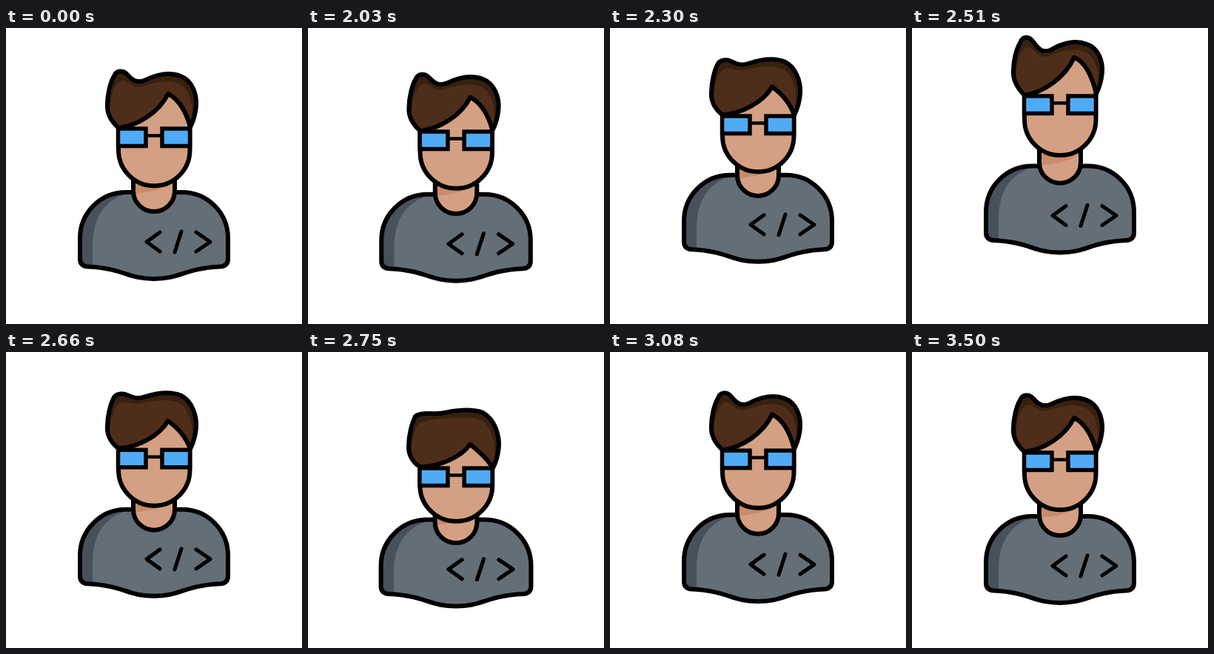
Animation, 400 px wide and 400 px high, one loop 3560 ms. Source, as an HTML page:

```html
<!DOCTYPE html>
<html lang="en">
<head>
<meta charset="utf-8">
<title>Jumping developer</title>
<style>
  html, body { margin: 0; width: 100%; height: 100%; overflow: hidden; background: #fff; }
  svg { display: block; width: 100vw; height: 100vh; }
  .line { fill: none; stroke: #000; stroke-width: 6; stroke-linejoin: round; stroke-linecap: round; }
</style>
</head>
<body>
<svg viewBox="0 0 400 400">
  <defs>
    <path id="torso" d="M100 284A62 62 0 0 1 162 222H238A62 62 0 0 1 300 284V312Q300 322 289 322.500C240 325 236 339 200 339S160 325 111 322.500Q100 322 100 312Z"/>
  </defs>
  <g id="figure">
    <use href="#torso" fill="#646e77"/>
    <path fill="#48505b" d="M100 284A62 62 0 0 1 162 222H172C134 229 117 254 117 296V322H111Q100 322 100 312Z"/>
    <use href="#torso" class="line"/>
    <path class="line" style="stroke-width:5" d="M208 276L190 289L208 302M237 275L228 303M257 276L276 289L257 302"/>
    <g id="neck">
      <path fill="#d4a083" d="M172 198V220A28 28 0 0 0 228 220V198Z"/>
      <path fill="#c98b6b" d="M172 200H228V207C214 218 195 222 172 224Z"/>
      <path class="line" d="M172 200V220A28 28 0 0 0 228 220V200"/>
    </g>
    <g id="face">
      <path fill="#d4a083" d="M152 110V165A48.250 48.250 0 0 0 248.500 165V125L228 80H165Z"/>
      <path class="line" d="M152 125V165A48.250 48.250 0 0 0 248.500 165V128"/>
    </g>
    <g id="hair">
      <path id="shade" fill="#38200f"/>
      <path id="light" fill="#4e2d1a"/>
      <path id="edge" class="line"/>
    </g>
    <g id="glasses" fill="#4fabf6" stroke="#000" stroke-width="5.500">
      <path stroke-width="4.500" d="M189 145.500H211"/>
      <rect x="151.500" y="136" width="37.500" height="23.500"/>
      <rect x="211" y="136" width="37.500" height="23.500"/>
    </g>
  </g>
</svg>
<script>
const LOOP = 3560, START = 2030, STEP = 30;
const el = id => document.getElementById(id);

// Turning points [time, value]: crouch, jump, land, then a fading bounce.
const bounce = [[1985, 0], [2100, 8], [2435, -40], [2815, 8], [3010, -3], [3230, 1.8], [3500, 0]];
const nodding = [[2000, 0], [2160, 11], [2480, -6], [2860, 15], [3080, -0.6], [3260, 0.4], [3500, 0]];
const flopping = [[2000, 0], [2240, 11], [2470, -6], [2780, 16], [3080, -2], [3300, 0.5], [3500, 0]];

// Sine easing from one turning point to the next.
function swing(points, t) {
  const i = points.findIndex(p => p[0] > t);
  if (i < 1) return 0;
  const [t0, a] = points[i - 1], [t1, b] = points[i];
  return a + (b - a) * (1 - Math.cos(Math.PI * (t - t0) / (t1 - t0))) / 2;
}

const move = (id, y) => el(id).setAttribute('transform', `translate(0 ${y.toFixed(2)})`);

// s flattens the quiff and pulls the parting down.
function drawHair(s) {
  const low = 135 - 0.2 * s;
  const fringe = `C243 ${112 + 0.6 * s} ${233 - 0.2 * s} ${96 + s} 219 ${89 + 0.8 * s}
    C207 ${114 + 0.3 * s} 178 132 152 ${low}Z`;
  const outer = `M152 ${low}C142 126 136 115 137 103
    C137 90 141 73 146 ${65 - 0.1 * s}
    C149 ${57 + 0.25 * s} 158 ${56.5 + 0.2 * s} 164 ${63 - 0.2 * s}
    C171 ${70.5 - 0.7 * s} 177 ${75 - 0.9 * s} 188 ${70.5 - 0.8 * s}
    C203 ${63 - 0.5 * s} 221 ${59 - 0.4 * s} 236 ${65 - 0.4 * s}
    C252 ${71 - 0.2 * s} 258 90 257 105C256 117 253 126 249 134${fringe}`;
  const inner = `M152 ${low}C143 126 139 114 141 103
    C143 86 148 72 158 71
    C166 ${71 - 0.2 * s} 170 ${83 - 0.9 * s} 184 ${79 - 0.8 * s}
    C202 ${73 - 0.5 * s} 224 ${68 - 0.4 * s} 238 ${78 - 0.4 * s}
    C251 ${88 - 0.2 * s} 255 112 249 132${fringe}`;
  el('shade').setAttribute('d', outer);
  el('edge').setAttribute('d', outer);
  el('light').setAttribute('d', inner);
}

function render(ms) {
  const t = ms < START ? 0 : START + Math.floor((ms - START) / STEP) * STEP;
  const y = swing(bounce, t), nod = swing(nodding, t);
  const wide = 1 + 0.003 * Math.max(0, y);
  el('figure').setAttribute('transform',
    `translate(200 ${y.toFixed(2)}) scale(${wide.toFixed(4)} 1) translate(-200 0)`);
  move('neck', nod * 0.5);
  move('face', nod);
  move('glasses', nod * 1.5);
  move('hair', nod * 1.7);
  drawHair(swing(flopping, t));
}

function tick() {
  render(performance.now() % LOOP);
  requestAnimationFrame(tick);
}
tick();
</script>
</body>
</html>
```
